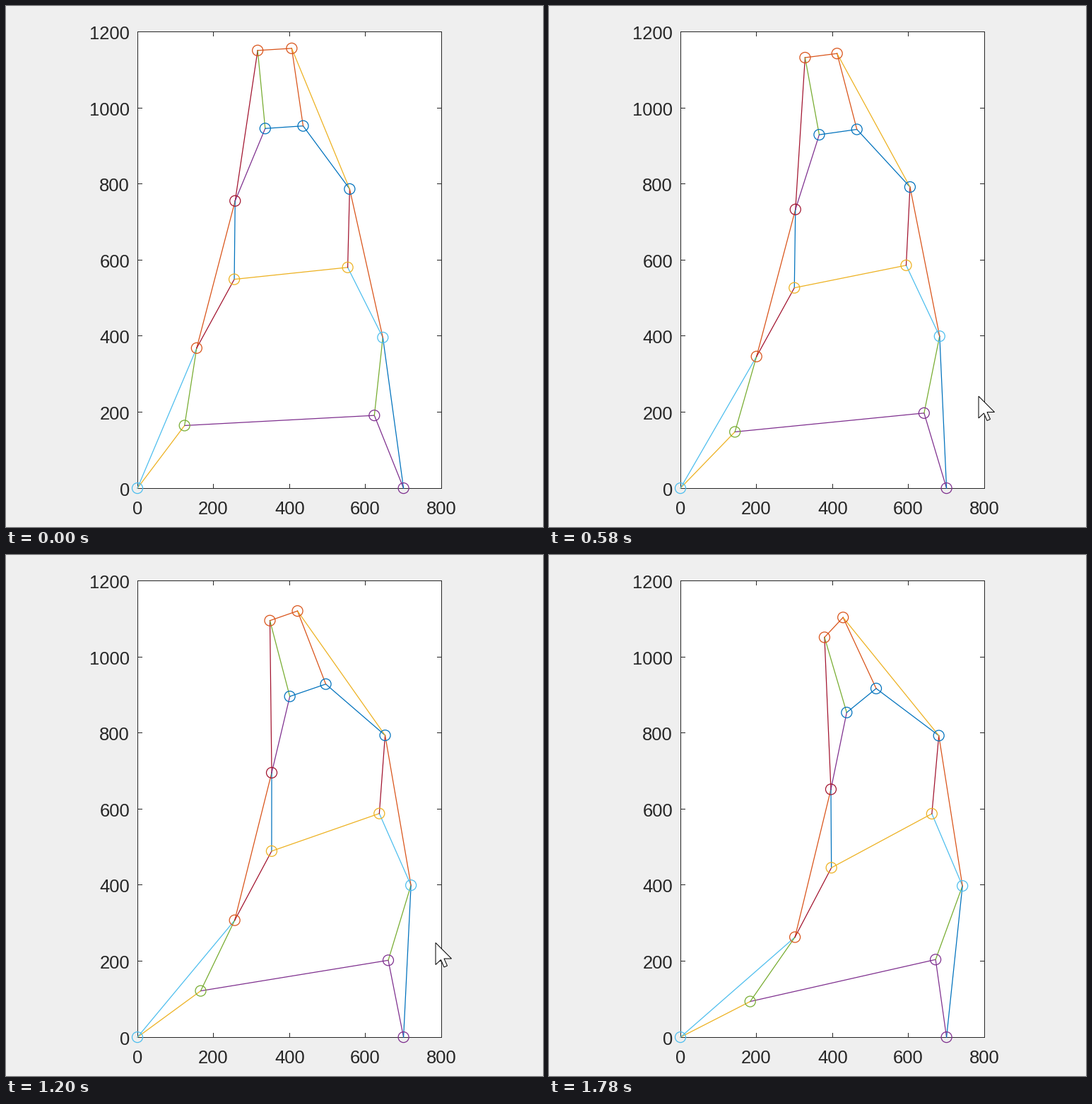
Write a matplotlib script that moves like this. It is 760 px wide and 737 px high and loops after 2020 ms.

```python
import numpy as np
import matplotlib.pyplot as plt
from matplotlib.animation import FuncAnimation

W, H, DPI = 760, 737, 100
FRAMES, INTERVAL = 101, 20
PX = 72 / DPI  # points per pixel

ORIGIN = np.array([186.0, 682.1])
SCALE = 0.538
INK = "#262626"
BLUE, ORANGE, YELLOW, PURPLE, GREEN, CYAN, MAROON = (
    "#0072BD", "#D95319", "#EDB120", "#7E2F8E", "#77AC30", "#4DBEEE", "#A2142F")

# Every arm is a flat triangle: base 400, apex 50 off its middle.
ARM = 400
SIDE = np.hypot(200, 50)
BUMP = np.arctan2(50, 200)
BARS = (500, 300, 100)
START = np.array([97.82, 102.6, 112.4])
RATE = np.array([-0.2005, -0.053, 0.241])

# Joints: l = left, r = right, m/n = left/right apex, numbered by storey.
JOINTS = dict(l0=CYAN, r0=PURPLE, m0=GREEN, n0=PURPLE,
              l1=ORANGE, r1=CYAN, m1=YELLOW, n1=YELLOW,
              l2=MAROON, r2=BLUE, m2=BLUE, n2=BLUE,
              l3=ORANGE, r3=ORANGE)
LINKS = [("l0", "m0", YELLOW), ("m0", "n0", PURPLE), ("n0", "r0", PURPLE),
         ("l0", "l1", CYAN), ("m0", "l1", GREEN), ("n0", "r1", GREEN),
         ("r0", "r1", BLUE),
         ("l1", "l2", ORANGE), ("l1", "m1", MAROON), ("m1", "l2", BLUE),
         ("m1", "n1", YELLOW), ("n1", "r1", CYAN), ("n1", "r2", MAROON),
         ("r1", "r2", ORANGE),
         ("l2", "l3", MAROON), ("l2", "m2", PURPLE), ("m2", "l3", GREEN),
         ("m2", "n2", BLUE), ("n2", "r2", BLUE), ("n2", "r3", ORANGE),
         ("r2", "r3", YELLOW), ("l3", "r3", ORANGE)]

# The simulation drops a beat about every tenth tick, then stops.
PAUSES = np.round(1.6 + 9.6 * np.arange(8))
STOP, LAST_STEP = 76, 69

ARROW = np.array([(0, 0), (0, 31), (7.5, 24), (12, 34.5), (16.5, 32.5),
                  (12, 22.5), (22.5, 22.5)])
MOUSE_T = [12, 17, 26, 29, 33, 68, 76, 81, 89]
MOUSE_X = [548, 583.5, 609, 608, 608, 608, 611, 611, 682]
MOUSE_Y = [740, 609.5, 554, 552, 548.5, 548.5, 548.5, 548.5, 740]


def polar(length, angle):
    return length * np.array([np.cos(angle), np.sin(angle)])


def to_px(point):
    return ORIGIN + SCALE * np.array(point) * (1, -1)


def crisp(v):
    """Centre of the pixel that holds v."""
    return np.floor(v) + 0.5


def step_at(tick):
    return LAST_STEP if tick >= STOP else tick - np.sum(PAUSES <= tick)


def solve(step):
    """Joint positions in pixels: right arms drive, left arms follow."""
    left, right = np.array([0.0, 0.0]), np.array([700.0, 0.0])
    pos = dict(l0=left, r0=right)
    for i, angle in enumerate(np.radians(START + RATE * step)):
        n = right + polar(SIDE, angle + BUMP)
        gap = n - left
        d = np.hypot(*gap)
        swing = np.arccos((SIDE**2 + d**2 - BARS[i]**2) / (2 * SIDE * d))
        lean = np.arctan2(gap[1], gap[0]) + swing
        pos[f"m{i}"], pos[f"n{i}"] = left + polar(SIDE, lean), n
        left = left + polar(ARM, lean + BUMP)
        right = right + polar(ARM, angle)
        pos[f"l{i + 1}"], pos[f"r{i + 1}"] = left, right
    return {k: to_px(p) for k, p in pos.items()}


fig = plt.figure(figsize=(W / DPI, H / DPI), dpi=DPI, facecolor="#efefef")
ax = fig.add_axes([0, 0, 1, 1])
ax.set(xlim=(0, W), ylim=(H, 0))
ax.axis("off")

LEFT, BOTTOM = crisp(ORIGIN)
RIGHT, TOP = crisp(to_px((800, 1200)))


def rule(xs, ys):
    ax.plot(xs, ys, color=INK, lw=PX, snap=False, zorder=2,
            solid_capstyle="projecting")


def label(x, y, value, align):
    ax.text(x, y, str(value), ha=align, va="baseline", color=INK,
            family="Liberation Sans", size=25.6 * PX)


ax.add_patch(plt.Rectangle((LEFT, TOP), RIGHT - LEFT, BOTTOM - TOP,
                           fc="white", ec="none", snap=False, zorder=1))
for y in (TOP, BOTTOM):
    rule([LEFT, RIGHT], [y, y])
for x in (LEFT, RIGHT):
    rule([x, x], [TOP, BOTTOM])
for v in range(0, 801, 200):
    x = crisp(to_px((v, 0))[0])
    rule([x, x], [BOTTOM, BOTTOM - 6])
    rule([x, x], [TOP, TOP + 6])
    label(x, 719, v, "center")
for v in range(0, 1201, 200):
    y = crisp(to_px((0, v))[1])
    rule([LEFT, LEFT + 6], [y, y])
    rule([RIGHT, RIGHT - 6], [y, y])
    label(175, y + 10.5, v, "right")

lines = [ax.plot([], [], color=c, lw=1.25 * PX, snap=False, zorder=3)[0]
         for _, _, c in LINKS]
rings = {k: ax.add_patch(plt.Circle((0, 0), 7.5, fill=False, ec=c,
                                    lw=1.25 * PX, zorder=4))
         for k, c in JOINTS.items()}
mouse = plt.Polygon(ARROW, fc="white", ec="black", lw=PX, zorder=5,
                    joinstyle="miter")
ax.add_patch(mouse)


def draw(tick):
    pos = solve(step_at(tick))
    for line, (a, b, _) in zip(lines, LINKS):
        line.set_data(*zip(pos[a], pos[b]))
    for key, ring in rings.items():
        ring.center = pos[key]
    tip = [np.interp(tick, MOUSE_T, MOUSE_X), np.interp(tick, MOUSE_T, MOUSE_Y)]
    mouse.set_xy(ARROW + tip)
    mouse.set_visible(MOUSE_T[0] < tick < MOUSE_T[-1])
    return [*lines, *rings.values(), mouse]


anim = FuncAnimation(fig, draw, frames=FRAMES, interval=INTERVAL,
                     repeat=True, repeat_delay=0, blit=False)
plt.show()
```
